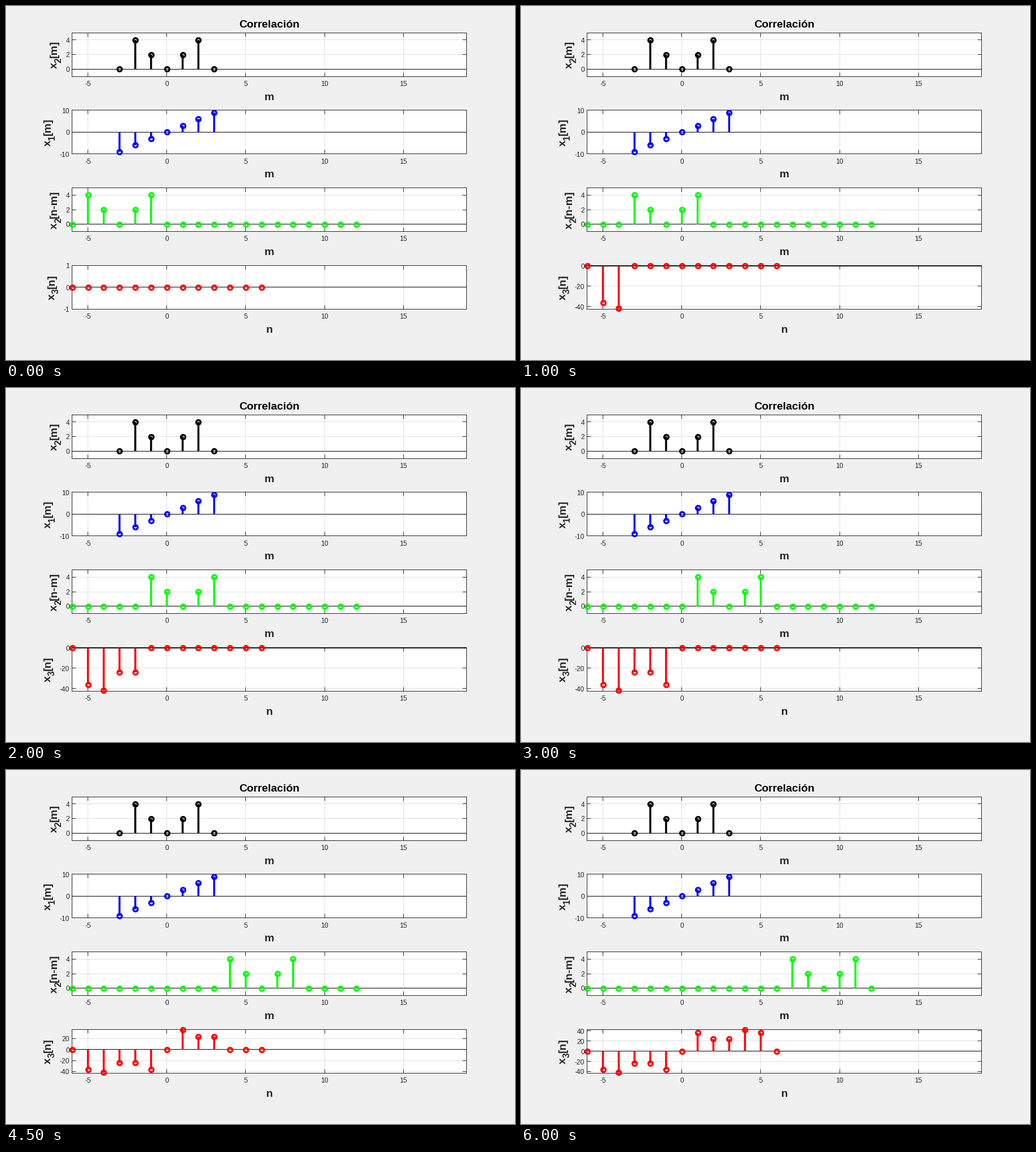
A matplotlib script for the animation above (6500 ms loop, 898x624 px).

```python
import math

import matplotlib.pyplot as plt
import numpy as np
from matplotlib.animation import FuncAnimation

W, H, DPI = 898, 624, 100
PT = 72 / DPI                      # points per pixel
LEFT, RIGHT, HEIGHT = 116.74, 812.69, 77
X_MIN, X_MAX = -6, 19
DARK, GRID, PAPER = "#262626", "#dfdfdf", "#f0f0f0"
TICK_SIZE, LABEL_SIZE, SUB_SCALE = 12, 19.4, 0.8
TICK_LEN = 7
EM = {"x": 0.556, "[": 0.333, "]": 0.333, "m": 0.889, "n": 0.611, "-": 0.333}

# The two signals and their full sliding product
M = np.arange(-3, 4)
X1 = 3 * M
X2 = np.array([0, 4, 2, 0, 2, 4, 0])
X3 = np.convolve(X1, X2)
N = np.arange(-6, 7)

plt.rcParams["font.family"] = "Liberation Sans"
fig = plt.figure(figsize=(W / DPI, H / DPI), dpi=DPI, facecolor=PAPER)
ax = fig.add_axes([0, 0, 1, 1])


def crisp(v):
    return np.floor(v) + 0.5


def to_x(v):
    return LEFT + (np.asarray(v) - X_MIN) * (RIGHT - LEFT) / (X_MAX - X_MIN)


def vline(x, y0, y1, color, width=1, z=2):
    ax.vlines(x, y0, y1, colors=color, linewidth=width * PT, zorder=z, snap=False)


def hline(y, x0, x1, color, z=2):
    ax.hlines(y, x0, x1, colors=color, linewidth=PT, zorder=z, snap=False)


def text(x, y, s, size, color=DARK, **kw):
    kw = {"ha": "center", "va": "baseline", **kw}
    ax.text(x, y, s, fontsize=size * PT, color=color, zorder=6, **kw)


def side_label(x, y, sub, rest):
    """Vertical bold label: x, a subscript, then the bracketed index."""
    lead = EM["x"] * LABEL_SIZE
    sub_w = 0.556 * SUB_SCALE * LABEL_SIZE
    total = lead + sub_w + sum(EM[c] for c in rest) * LABEL_SIZE
    start = y + total / 2
    parts = (("x", x, 0, LABEL_SIZE),
             (sub, x + 7, lead, LABEL_SIZE * SUB_SCALE),
             (rest, x, lead + sub_w, LABEL_SIZE))
    for s, px, shift, size in parts:
        text(px, start - shift, s, size, weight="bold", rotation=90,
             rotation_mode="anchor", ha="left")


def panel(row, xs, ys, color, lims, ticks, sub, index, label_x, xlabel):
    top = 47 + 136.75 * row
    bottom = top + HEIGHT
    lo, hi = lims

    def to_y(v):
        return bottom - (np.asarray(v) - lo) * HEIGHT / (hi - lo)

    l, r, t, b = (crisp(v) for v in (LEFT, RIGHT, top, bottom))
    ax.add_patch(plt.Rectangle((l, t), r - l, b - t, fc="white", ec="none",
                               zorder=0, snap=False))

    # Grid, ticks and tick labels
    for v in range(-5, 16, 5):
        x = crisp(to_x(v))
        vline(x, t, b, GRID, z=1)
        vline(x, t, t + TICK_LEN, DARK)
        vline(x, b - TICK_LEN, b, DARK)
        text(to_x(v), bottom + 17, str(v), TICK_SIZE)
    for v in ticks:
        y = crisp(to_y(v))
        hline(y, l, r, GRID, z=1)
        hline(y, l, l + TICK_LEN, DARK)
        hline(y, r - TICK_LEN, r, DARK)
        text(112, to_y(v) + 4.8, str(v), TICK_SIZE, ha="right")

    for x in (l, r):
        vline(x, t - 0.5, b + 0.5, DARK)
    for y in (t, b):
        hline(y, l, r, DARK)

    # Stems
    base = crisp(to_y(0))
    hline(base, l, r, "black", z=3)
    px, py = to_x(xs), to_y(ys)
    vline(px, base, py, color, width=3.5, z=4)
    ax.plot(px, py, "o", mfc="none", mec=color, ms=7.8 * PT, mew=3.3 * PT,
            zorder=5, clip_on=False)

    side_label(label_x, (top + bottom) / 2, sub, index)
    text((LEFT + RIGHT) / 2, bottom + 41.5, xlabel, LABEL_SIZE, weight="bold")


def fit(ys):
    """Limits with a one percent margin, and round ticks inside them."""
    lo, hi = min(ys), max(ys)
    if lo == hi:
        return (-1, 1), [-1, 0, 1]
    pad = 0.01 * (hi - lo)
    lo, hi = lo - pad, hi + pad
    step = 10 if hi - lo < 40 else 20
    return (lo, hi), range(math.ceil(lo / step) * step, math.floor(hi) + 1, step)


def draw(k):
    ax.clear()
    ax.set_xlim(0, W)
    ax.set_ylim(H, 0)
    ax.axis("off")

    text((LEFT + RIGHT) / 2, 38.5, "Correlación", 19.3, "black", weight="bold")

    x2_view = ((-1, 5), (0, 2, 4))
    panel(0, M, X2, "black", *x2_view, "2", "[m]", 90, "m")
    panel(1, M, X1, "blue", (-10, 10), (-10, 0, 10), "1", "[m]", 79, "m")

    slots = np.arange(-6, 13)
    moving = np.zeros(len(slots))
    moving[k:k + len(X2)] = X2
    panel(2, slots, moving, "lime", *x2_view, "2", "[n-m]", 90, "m")

    total = np.where(N <= k - 6, X3, 0)
    label_x = 79 if total.any() else 86
    panel(3, N, total, "red", *fit(total), "3", "[n]", label_x, "n")
    return []


anim = FuncAnimation(fig, draw, frames=len(N), init_func=lambda: [],
                     interval=500, repeat=True, repeat_delay=0)
plt.show()
```
